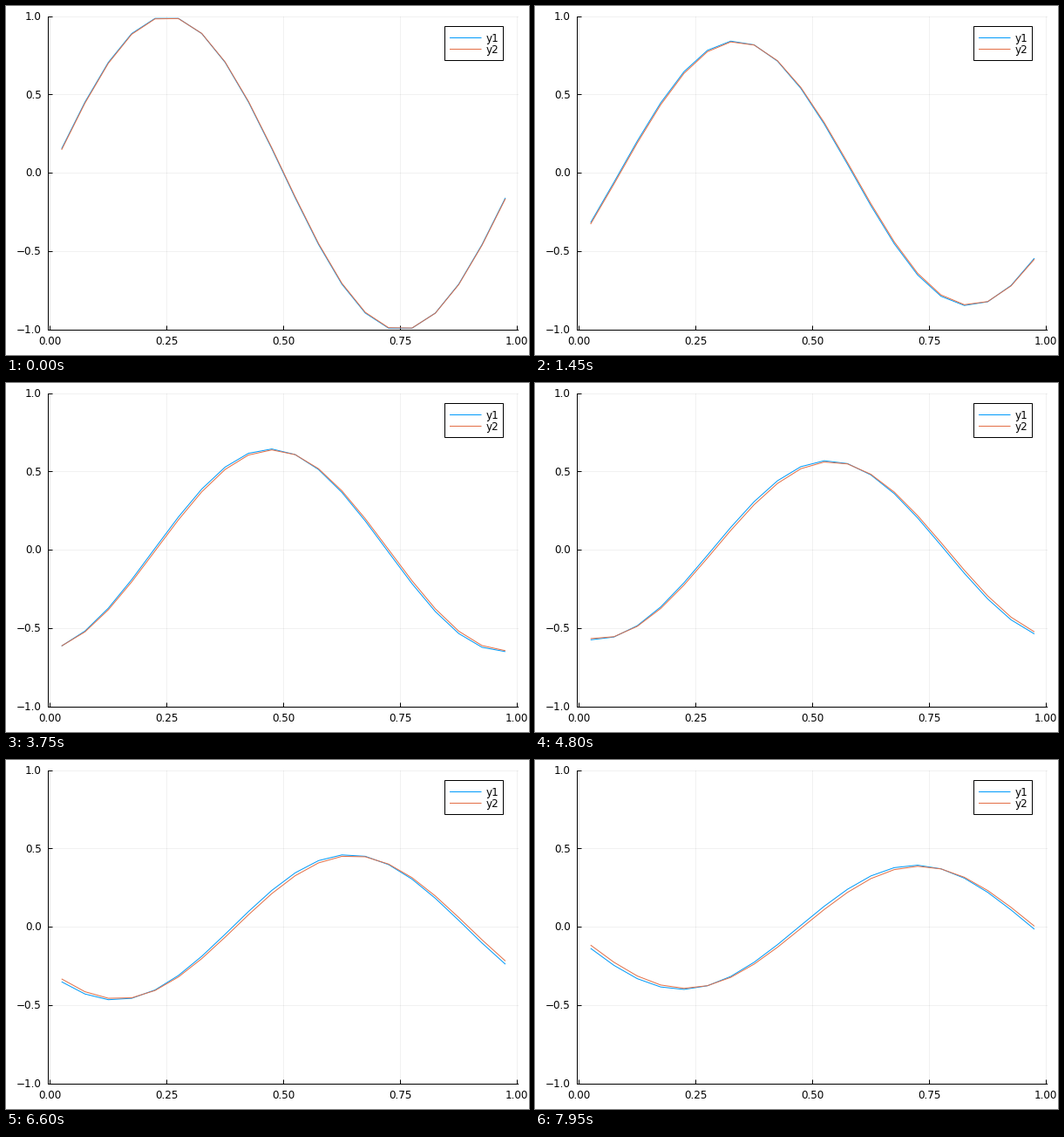
These frames come from a looping animation (600 by 400 pixels, 8 s). A matplotlib script:

```python
import numpy as np
import matplotlib.pyplot as plt
from matplotlib.animation import FuncAnimation
from matplotlib.patches import Rectangle

W, H, DPI = 600, 400, 100
PX = 72 / DPI                      # one pixel in points
FRAMES, INTERVAL = 160, 50

LEFT, RIGHT, TOP, BOTTOM = 48.5, 588.2, 12.0, 371.5
X_PAD = 0.0035                     # x axis reaches a little past 0 and 1
BLUE, ORANGE = "#009afa", "#e36f47"

# Advection-diffusion of one sine wave on a periodic grid
CELLS, SPEED, NU, DT = 20, 1.0, 0.05, 0.001
STEPS_PER_FRAME = 3
STEP = 1 / CELLS
K = 2 * np.pi
x = (np.arange(CELLS) + 0.5) * STEP

# Growth of the wave in one explicit Euler step with central differences
GAIN = (1 - DT * NU * (2 * np.sin(K * STEP / 2) / STEP) ** 2
        - 1j * DT * SPEED * np.sin(K * STEP) / STEP)


def numeric(step):
    return (GAIN ** step * np.exp(1j * K * x)).imag


def exact(step):
    t = (step + 1) * DT            # the clock runs one step ahead
    return np.exp(-NU * K ** 2 * t) * np.sin(K * (x - SPEED * t))


def px(v):
    return LEFT + (v + X_PAD) / (1 + 2 * X_PAD) * (RIGHT - LEFT)


def py(v):
    return TOP + (1 - v) / 2 * (BOTTOM - TOP)


def crisp(c):
    return np.floor(c) + 0.5


plt.rcParams["font.family"] = "DejaVu Sans"
fig = plt.figure(figsize=(W / DPI, H / DPI), dpi=DPI, facecolor="white")
ax = fig.add_axes([0, 0, 1, 1])
ax.set_xlim(0, W)
ax.set_ylim(H, 0)
ax.axis("off")


def stroke(xs, ys, color="black", **kw):
    return ax.plot(xs, ys, color=color, lw=PX, snap=False,
                   solid_capstyle="butt", solid_joinstyle="miter", **kw)[0]


def label(cx, base, text, ha):
    ax.text(cx, base, text, ha=ha, va="baseline", fontsize=12 * PX,
            color="black", zorder=6)


# Grid, ticks and tick labels
for v in np.linspace(0, 1, 5):
    c = crisp(px(v))
    stroke([c, c], [TOP, BOTTOM], alpha=0.055, zorder=1)
    stroke([c, c], [BOTTOM, BOTTOM - 5], zorder=2)
    label(px(v), 387.6, f"{v:.2f}", "center")
for v in np.linspace(-1, 1, 5):
    c = crisp(py(v))
    stroke([LEFT, RIGHT], [c, c], alpha=0.055, zorder=1)
    stroke([LEFT, LEFT + 5], [c, c], zorder=2)
    label(40.6, py(v) + 3.7, f"{v:.1f}".replace("-", "\u2212"), "right")

stroke([LEFT, LEFT], [TOP, BOTTOM + 0.5], zorder=2)
stroke([LEFT - 0.5, RIGHT], [BOTTOM, BOTTOM], zorder=2)

# Curves
lines = [stroke(px(x), py(f(0)), color, zorder=z)
         for f, color, z in [(numeric, BLUE, 3), (exact, ORANGE, 4)]]

# Legend
ax.add_patch(Rectangle((503.5, 23.5), 67, 39, fc="white", ec="black",
                       lw=PX, snap=False, zorder=5))
for name, color, y in [("y1", BLUE, 36.5), ("y2", ORANGE, 49.5)]:
    stroke([509, 545.5], [y, y], color, zorder=6)
    label(550.8, y + 4.6, name, "left")


def update(n):
    step = n * STEPS_PER_FRAME
    lines[0].set_ydata(py(numeric(step)))
    lines[1].set_ydata(py(exact(step)))
    return lines


anim = FuncAnimation(fig, update, frames=FRAMES, interval=INTERVAL,
                     repeat=True, repeat_delay=0, blit=False)
plt.show()
```
